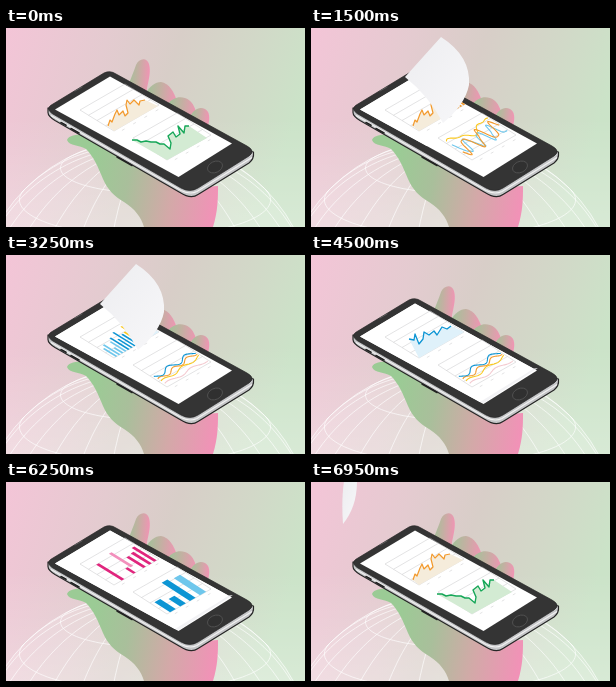
These frames come from a looping animation (299x199 px, 7000 ms). An HTML page:

```html
<!DOCTYPE html>
<html lang="en">
<head>
<meta charset="utf-8">
<title>Charts on a phone</title>
<style>
html, body { margin: 0; width: 100%; height: 100%; overflow: hidden; }
svg { display: block; width: 100%; height: 100%; }
.thin * { vector-effect: non-scaling-stroke; }
</style>
</head>
<body>
<svg viewBox="0 0 299 199" preserveAspectRatio="none">
  <defs>
    <linearGradient id="bg" gradientUnits="userSpaceOnUse" x1="0" y1="10" x2="285" y2="105">
      <stop offset="0" stop-color="#f3c5d7"/><stop offset=".32" stop-color="#e4cbd0"/>
      <stop offset=".55" stop-color="#d8cec8"/><stop offset=".78" stop-color="#d2d8c8"/>
      <stop offset="1" stop-color="#cbe3c8"/>
    </linearGradient>
    <linearGradient id="haze" x1="0" y1="0" x2="0" y2="1">
      <stop offset=".45" stop-color="#fff" stop-opacity="0"/><stop offset="1" stop-color="#fff" stop-opacity=".24"/>
    </linearGradient>
    <linearGradient id="palm" gradientUnits="userSpaceOnUse" x1="85" y1="140" x2="212" y2="165">
      <stop offset="0" stop-color="#9bcb95"/><stop offset=".3" stop-color="#a9bf9b"/>
      <stop offset=".65" stop-color="#d3a9a8"/><stop offset="1" stop-color="#f192b7"/>
    </linearGradient>
    <linearGradient id="finger" x1="0" y1="0" x2="1" y2=".1">
      <stop offset="0" stop-color="#9fc498"/><stop offset=".5" stop-color="#c3b0a2"/>
      <stop offset="1" stop-color="#ee96b3"/>
    </linearGradient>
    <linearGradient id="sheet" x1="0" y1="0" x2="1" y2="1">
      <stop offset="0" stop-color="#ededf0"/><stop offset="1" stop-color="#f7f7f9"/>
    </linearGradient>
    <clipPath id="flat"><path id="flatPath"/></clipPath>
  </defs>

  <rect width="299" height="199" fill="url(#bg)"/>
  <rect width="299" height="199" fill="url(#haze)"/>
  <circle cx="139" cy="280" r="169" fill="#fff" fill-opacity=".14"/>
  <path id="globe" fill="none" stroke="#fff" stroke-opacity=".72" stroke-width=".9"/>

  <g fill="url(#finger)">
    <path d="M122 58C125 50 128 43 130 37C133 30 141 29 143 36C145 43 143 51 141 60L140 68Z"/>
    <path d="M140 65C144 58 149 54 155 54C163 55 168 64 171 73L170 84Z"/>
    <path d="M162 76C166 70 173 68 179 70C186 72 189 79 191 87L188 95Z"/>
    <path d="M184 89C187 82 193 78 199 81C204 84 204 90 202 98Z"/>
  </g>
  <path fill="url(#palm)" d="M61 112C63 107 70 107 77 106L110 120L184 160L212 158C212 170 212 183 207 199L138 199C135 189 129 181 118 174C108 168 102 162 97 151C92 139 88 129 80 121C74 117 63 118 61 112Z"/>

  <!-- phone -->
  <path fill="#c6c7c9" stroke="#262626" stroke-width="1.2" stroke-linejoin="round" d="M42 80L42 84.500C42 88 45 90 49 92.500L174 164.500C181 169 187 170 192 166.500L243 135C247 132 248 129 247.500 124Z"/>
  <path fill="none" stroke="#f1f1f1" stroke-width="1.100" d="M45 87.500L175 162.500Q184 167 191 163.500L246 129.500"/>
  <path fill="#343434" stroke="#262626" stroke-width=".7" d="M44.500 77.500L98 45Q104 42 110 46L241 118Q250 123 243 128L192 160Q184 165 175 160L46 85.500Q40 81 44.500 77.500Z"/>
  <path fill="none" stroke="#222" stroke-width="1.600" stroke-linecap="round" d="M55 94.500L60 97.300M65 100.500L73 105M111 129L126 137.500"/>
  <path fill="none" stroke="#666" stroke-width=".8" stroke-linecap="round" d="M69 63L76 59"/>
  <ellipse cx="209" cy="139" rx="7.800" ry="5.500" transform="rotate(-24 209 139)" fill="#303030" stroke="#595959" stroke-width=".7"/>
  <path fill="#fff" d="M49 81.500L104 48.500L226 115.500L172.500 149Z"/>

  <g id="next"></g>
  <g id="prev" clip-path="url(#flat)"></g>
  <path id="page" fill="url(#sheet)"/>
</svg>
<script>
const $ = id => document.getElementById(id);
const ORANGE = '#f39a2d', YELLOW = '#fbc91f', BLUE = '#0d95d4', SKY = '#6fc7ec',
      GREEN = '#16a758', PINK = '#e0257d', ROSE = '#f290bc';
const TOP = 'matrix(45 -26 -34 -21 108 103)', LOW = 'matrix(44 -25 -34 -22 161 132)';

const poly = (pts, color, w = 1.2) =>
  `<polyline points="${pts}" fill="none" stroke="${color}" stroke-width="${w}" stroke-linejoin="round"/>`;
const area = (pts, base, color) => `<polygon points="${pts} ${base}" fill="${color}"/>`;
const chart = (m, body) => `<g class="thin" transform="${m}">${body}</g>`;
const bar = (x, w, h, color, y = 0) =>
  `<rect x="${x}" y="${y}" width="${w}" height="${h}" fill="${color}"/>`;

function curve(f, color, from = 0.04, to = 0.98) {
  const pts = [];
  for (let i = 0; i <= 60; i++) {
    const x = from + (to - from) * i / 60;
    pts.push(x.toFixed(3) + ',' + f(x).toFixed(3));
  }
  return poly(pts.join(' '), color, 1.1);
}

function grid(m) {
  let d = 'M0 0V1M1 0V1';
  for (let i = 0; i <= 4; i++) d += `M0 ${i / 4}H1`;
  for (let i = 0; i < 4; i++) d += `M${0.1 + i * 0.25} -.1h.06`;
  return chart(m, `<path d="${d}" fill="none" stroke="#c6c6c8" stroke-width=".5"/>`);
}

const gold = '102,98 104,92 106,94 109,86 111,82 113,87 117,83 119,88 122,85 120,77 121,72 124,76 128,72 133,77 134,73 139,72';
const fall = '126,112 131,112 135,114 140,113 145,114 150,114 154,116 158,116 164,121 165,115 162,108 167,104 170,109 174,106 172,98 178,105 179,98 183,98';
const azure = '98,84 103,85 104,79 108,89 112,84 113,77 118,80 123,76 126,80 131,72 136,74 140,71';

let thinBars = '';
for (let i = 0; i < 15; i++) {
  const group = i >> 2;
  const h = [0.38, 0.52, 0.55, 0.42][group] + 0.13 * Math.sin(i * 2.3);
  thinBars += bar(0.04 + i * 0.068, 0.036, h, [SKY, BLUE, YELLOW, ORANGE][group]);
}

const wave = (mid, amp, k, ph) => x => mid + amp * Math.sin(k * x + ph) + 0.05 * Math.sin(2.3 * k * x);
const pages = [
  area(gold, '152,78 108,103', '#f5ecdb') + poly(gold, ORANGE) +
    area(fall, '201,110 161,132', '#d3ebd3') + poly(fall, GREEN, 1.4),
  chart(TOP, thinBars) + chart(LOW,
    curve(wave(0.7, 0.12, 9, 0.2), YELLOW) + curve(wave(0.4, 0.22, 24, 1), SKY) +
    curve(wave(0.42, 0.25, 19, 3), ORANGE)),
  area(azure, '153,77 108,103', '#dff1fa') + poly(azure, BLUE, 1.3) + chart(LOW,
    curve(x => 0.1 + 0.04 * Math.sin(12 * x), '#f3c9cf') +
    curve(x => 0.2 + 0.1 * x + 0.04 * Math.sin(14 * x), YELLOW) +
    curve(x => 0.28 + 0.15 * x + 0.05 * Math.sin(18 * x), ORANGE) +
    curve(x => 0.4 + 0.08 * x + 0.07 * Math.sin(15 * x + 2), BLUE)),
  chart(TOP, bar(0.17, 0.06, 0.75, PINK) + bar(0.43, 0.055, 0.24, PINK) +
    bar(0.52, 0.06, 0.64, ROSE, 0.2) + bar(0.65, 0.06, 0.5, PINK) +
    bar(0.78, 0.06, 0.54, PINK) + bar(0.89, 0.06, 0.66, PINK)) +
  chart(LOW, bar(0.07, 0.13, 0.46, BLUE) + bar(0.3, 0.13, 0.34, BLUE) +
    bar(0.52, 0.13, 0.83, BLUE) + bar(0.75, 0.14, 0.77, SKY))
].map(body => grid(TOP) + grid(LOW) + body);

// Curl pose: free edge A-B, fold C-D
const poses = [
  [173, 148, 227, 113, 223, 113.5, 169, 147],
  [168, 134, 222, 98, 214, 109, 163, 143],
  [158, 111, 208, 73, 206, 98, 156, 133],
  [139, 85, 184, 44, 192, 83, 148, 120],
  [117, 64, 158, 22, 176, 70, 140, 108],
  [94, 49, 130, 9, 158, 57, 132, 95],
  [64, 42, 91, -6, 124, 38, 102, 82],
  [45, 42, 60, -16, 86, 12, 66, 62]
];

function curl([ax, ay, bx, by, cx, cy, dx, dy], k) {
  const s = Math.min(1, k / 4);
  const ex = Math.max(bx, cx) + 2 * s, ey = by + (cy - by) * 0.4;
  return `M${ax} ${ay}L${bx} ${by}Q${ex} ${ey} ${cx} ${cy}` +
    `Q${cx - 4 * s} ${cy + 20 * s} ${dx} ${dy}` +
    `Q${(ax + dx) / 2 + 5 * s} ${(ay + dy) / 2 - 4 * s} ${ax} ${ay}Z`;
}

function leftOfFold([, , , , cx, cy, dx, dy]) {
  const vx = (dx - cx) * 9, vy = (dy - cy) * 9;
  return `M${cx - vx} ${cy - vy}L${dx + vx} ${dy + vy}L-900 900L-900 -900Z`;
}

function drawGlobe() {
  const rad = Math.PI / 180, R = 169, tilt = 17 * rad;
  let d = '';
  const trace = (n, at) => {
    let pen = 'M';
    for (let i = 0; i <= n; i++) {
      const [lat, lon] = at(i / n).map(v => v * rad);
      const x = Math.cos(lat) * Math.sin(lon), z = Math.cos(lat) * Math.cos(lon), y = Math.sin(lat);
      if (y * Math.sin(tilt) + z * Math.cos(tilt) < 0) { pen = 'M'; continue; }
      const sy = y * Math.cos(tilt) - z * Math.sin(tilt);
      d += pen + (139 + R * x).toFixed(1) + ' ' + (280 - R * sy).toFixed(1);
      pen = 'L';
    }
  };
  for (let lat = 24; lat < 90; lat += 18) trace(120, k => [lat, k * 360 - 180]);
  for (let lon = 0; lon < 360; lon += 15) trace(40, k => [k * 86, lon]);
  d += 'M-30 280A169 169 0 0 1 308 280';
  $('globe').setAttribute('d', d);
}

let shown = '';
function render(ms) {
  const t = ms % 7000, n = Math.floor(t / 1750), f = t % 1750 - 1000;
  const step = f < 0 ? -1 : f < 600 ? Math.floor(f / 100) : f < 650 ? 6 : f < 700 ? 7 : 8;
  const key = n + ':' + step;
  if (key === shown) return;
  shown = key;
  const pose = poses[step], flat = step >= 0 && step < 7;
  $('next').innerHTML = pages[step < 0 ? n : (n + 1) % 4];
  $('prev').innerHTML = flat
    ? '<path fill="#fff" d="M49 81.5L104 48.5L226 115.5L172.5 149Z"/>' + pages[n] : '';
  if (flat) $('flatPath').setAttribute('d', leftOfFold(pose));
  $('page').setAttribute('d', pose ? curl(pose, step)
    : step === 8 ? 'M33 -1L46 -1C46 17 41 31 32 42C31 28 31 13 33 -1Z' : '');
}

drawGlobe();
const start = performance.now();
function tick() {
  render(performance.now() - start);
  requestAnimationFrame(tick);
}
tick();
</script>
</body>
</html>
```
